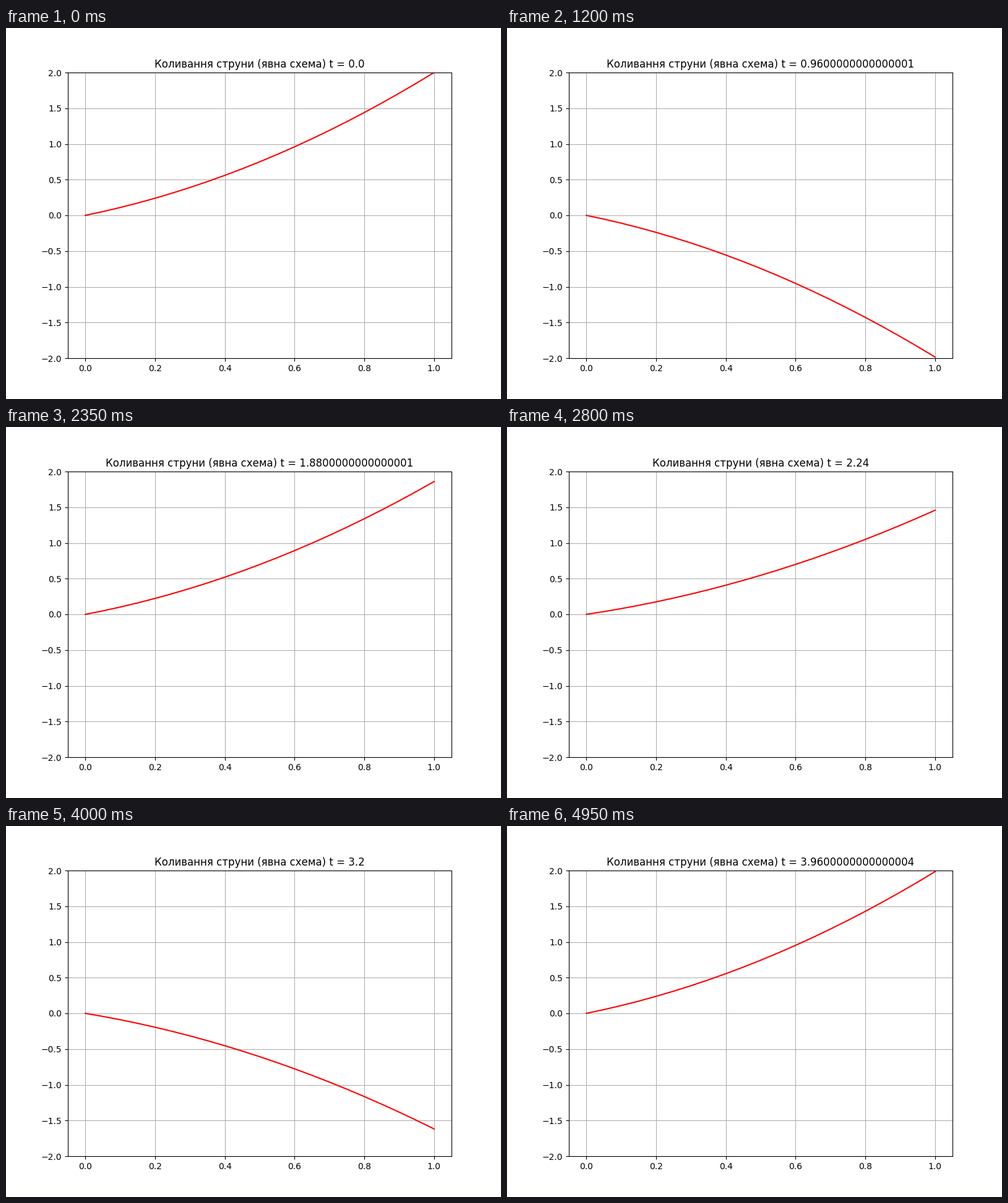
Animation of 800x600 px, one loop 5 s. Source, as a matplotlib script:

```python
import math

import matplotlib.pyplot as plt
import numpy as np
from matplotlib.animation import FuncAnimation

plt.rcParams["font.family"] = "DejaVu Sans"

FRAMES = 100
INTERVAL = 50          # ms
TAU = 4 / 300          # time step of the scheme
STEPS_PER_FRAME = 3

x = np.linspace(0, 1, 21)
shape = x**2 + x

fig, ax = plt.subplots(figsize=(8, 6), dpi=100)
line, = ax.plot(x, shape, color="red")
ax.set_xlim(-0.05, 1.05)
ax.set_ylim(-2, 2)
ax.grid(True)
title = ax.set_title("")


def update(frame):
    t = frame * STEPS_PER_FRAME * TAU
    line.set_ydata(shape * math.cos(math.pi * t))
    title.set_text(f"Коливання струни (явна схема) t = {t}")
    return line, title


anim = FuncAnimation(fig, update, frames=FRAMES, interval=INTERVAL,
                     repeat=True, repeat_delay=0, blit=False)
plt.show()
```
